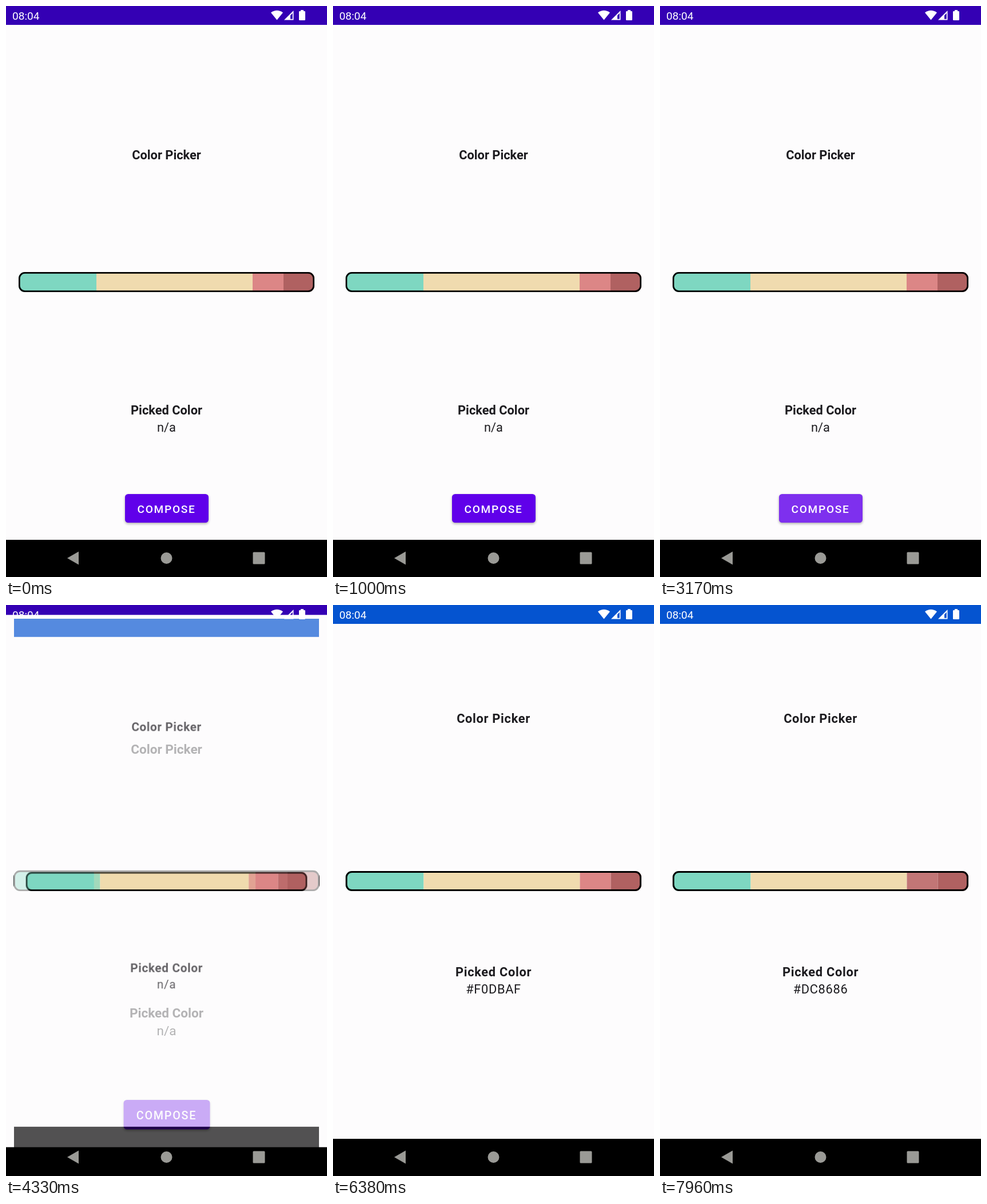
Recreate the animation shown at these times as an HTML page with a canvas. Size 561 px wide and 998 px high, loop 8000 ms.

```html
<!DOCTYPE html>
<html lang="en">
<head>
<meta charset="utf-8">
<title>Color Picker</title>
<style>
  html, body { margin: 0; width: 100%; height: 100%; overflow: hidden; background: #000; }
  canvas { display: block; }
</style>
</head>
<body>
<canvas id="stage" width="561" height="998"></canvas>
<script>
const W = 561, H = 998, CX = W / 2, LOOP = 8000;
const INK = '#1c1b1f', PAGE = '#fdfcfd';
const STATUS_H = 33, NAV_Y = 933;
const SWITCH_AT = 4247, SWITCH_MS = 400;
const BUTTON_TAP = 2830;
const PALETTE = ['#7ED7C1', '#F0DBAF', '#DC8686', '#B06161'];
const EDGES = [22, 158, 431, 485, 539];
const TAPS = [
  { at: 5540, slot: 0 },
  { at: 6380, slot: 1 },
  { at: 7400, slot: 2 }
];

const stage = document.getElementById('stage').getContext('2d');
const layerCanvas = document.createElement('canvas');
layerCanvas.width = W;
layerCanvas.height = H;
const layer = layerCanvas.getContext('2d');

const clamp = v => Math.min(1, Math.max(0, v));
const mix = (a, b, p) => a + (b - a) * p;

function cubic(a, b, c, d, t) {
  const u = 1 - t;
  return a * u * u * u + 3 * b * u * u * t + 3 * c * u * t * t + d * t * t * t;
}

// Two joined Bezier pieces: a quick start and a very slow finish.
function extraSlowIn(x) {
  if (x <= 0) return 0;
  if (x >= 1) return 1;
  const k = 1 / 6;
  const [xs, ys] = x < k
    ? [[0, 0.05, 0.133333, k], [0, 0, 0.06, 0.4]]
    : [[k, 0.208333, 0.25, 1], [0.4, 0.82, 1, 1]];
  let lo = 0, hi = 1;
  for (let i = 0; i < 24; i++) {
    const mid = (lo + hi) / 2;
    if (cubic(...xs, mid) < x) lo = mid; else hi = mid;
  }
  return cubic(...ys, lo);
}

function box(c, x, y, w, h, color) {
  c.fillStyle = color;
  c.fillRect(x, y, w, h);
}

function roundBox(c, x, y, w, h, r) {
  c.beginPath();
  c.roundRect(x, y, w, h, r);
}

function polygon(c, points) {
  c.beginPath();
  points.forEach(([x, y]) => c.lineTo(x, y));
  c.closePath();
}

function label(c, text, y, { weight = 400, size = 21.82, spacing = 0, color = INK } = {}) {
  c.font = `${weight} ${size}px Roboto, sans-serif`;
  c.letterSpacing = spacing + 'px';
  c.fillStyle = color;
  c.textAlign = 'left';
  c.fillText(text, CX - c.measureText(text).width / 2, y);
}

function ripple(c, age, x, y, reach, rgb, strength) {
  if (age <= 0 || age >= 800) return;
  const grow = 1 - (1 - clamp(age / 300)) ** 2;
  const alpha = strength * clamp(age / 75) * (1 - clamp((age - 560) / 240));
  c.fillStyle = `rgba(${rgb}, ${alpha})`;
  c.beginPath();
  c.arc(x, y, mix(8, reach, grow), 0, 7);
  c.fill();
}

function colorBar(c, time, shift, stroke) {
  const top = 465, height = 35;
  c.save();
  roundBox(c, 22, top, 517, height, 11);
  c.clip();
  PALETTE.forEach((color, i) => {
    const left = EDGES[i] + (i ? shift : 0);
    const width = EDGES[i + 1] + shift - left;
    box(c, left, top, width, height, color);
    for (const tap of TAPS) {
      if (tap.slot !== i) continue;
      c.save();
      c.beginPath();
      c.rect(left, top, width, height);
      c.clip();
      ripple(c, time - tap.at, left + width / 2, 482.5, width / 2 + 12, '0, 0, 0', 0.12);
      c.restore();
    }
  });
  c.restore();
  roundBox(c, 22 + stroke / 2, top + stroke / 2, 517 - stroke, height - stroke, 11 - stroke / 2);
  c.strokeStyle = '#000';
  c.lineWidth = stroke;
  c.stroke();
}

function frameBars(c, color) {
  box(c, 0, 0, W, H, PAGE);
  box(c, 0, 0, W, STATUS_H, color);
  box(c, 0, NAV_Y, W, H - NAV_Y, '#000');
}

function composeButton(c, time) {
  c.save();
  c.shadowColor = 'rgba(0, 0, 0, 0.32)';
  c.shadowBlur = 4;
  c.shadowOffsetY = 2;
  roundBox(c, 208, 853, 146, 50, 5.5);
  c.fillStyle = '#6000ea';
  c.fill();
  c.restore();
  c.save();
  roundBox(c, 208, 853, 146, 50, 5.5);
  c.clip();
  ripple(c, time - BUTTON_TAP, 281, 878, 84, '255, 255, 255', 0.19);
  c.restore();
  label(c, 'COMPOSE', 885.5, { weight: 500, size: 19.1, spacing: 1.7, color: '#fff' });
}

function firstScreen(c, time) {
  frameBars(c, '#3400b4');
  label(c, 'Color Picker', 268, { weight: 700 });
  colorBar(c, 0, 0, 2.7);
  label(c, 'Picked Color', 714, { weight: 700 });
  label(c, 'n/a', 744);
  composeButton(c, time);
}

function secondScreen(c, time) {
  const spacing = 0.68;
  const picked = TAPS.filter(tap => time >= tap.at).pop();
  frameBars(c, '#0554d0');
  label(c, 'Color Picker', 206, { weight: 700, spacing });
  colorBar(c, time, 0.5, 3);
  label(c, 'Picked Color', 649, { weight: 700, spacing });
  label(c, picked ? PALETTE[picked.slot] : 'n/a', 678.5, { spacing });
}

function systemIcons(c) {
  c.fillStyle = '#fff';
  c.font = '400 19.1px Roboto, sans-serif';
  c.letterSpacing = '0px';
  c.textAlign = 'left';
  c.fillText('08:04', 11, 24);

  c.beginPath();
  c.moveTo(473.5, 24.5);
  c.lineTo(463, 11.5);
  c.quadraticCurveTo(473.5, 4, 484, 11.5);
  c.closePath();
  c.fill();

  polygon(c, [[486, 24.5], [502.5, 8], [502.5, 24.5]]);
  polygon.call(null, c, [[486, 24.5], [502.5, 8], [502.5, 24.5]]);
  c.moveTo(497, 16.5);
  c.lineTo(500.8, 12.6);
  c.lineTo(500.8, 22.8);
  c.lineTo(497, 22.8);
  c.closePath();
  c.fill('evenodd');

  roundBox(c, 512, 9, 11, 16, 1.3);
  c.fill();
  c.fillRect(515, 7, 5, 3);

  c.fillStyle = '#9a9a96';
  polygon(c, [[107, 965], [127, 953.5], [127, 976.5]]);
  c.fill();
  c.beginPath();
  c.arc(280.5, 965, 10, 0, 7);
  c.fill();
  roundBox(c, 431.5, 954.5, 21, 21, 1.5);
  c.fill();
}

function scaleAboutCenter(c, s) {
  c.translate(CX, H / 2);
  c.scale(s, s);
  c.translate(-CX, -H / 2);
}

function draw(time) {
  const age = time - SWITCH_AT;
  const progress = extraSlowIn(age / SWITCH_MS);
  const alpha = clamp((age - 50) / 50);

  stage.save();
  scaleAboutCenter(stage, mix(1, 1.05, progress));
  firstScreen(stage, time);
  stage.restore();

  if (alpha > 0) {
    secondScreen(layer, time);
    stage.save();
    stage.globalAlpha = alpha;
    scaleAboutCenter(stage, mix(0.85, 1, progress));
    stage.drawImage(layerCanvas, 0, 0);
    stage.restore();
  }
  systemIcons(stage);
}

const start = performance.now();
function tick() {
  draw((performance.now() - start) % LOOP);
  requestAnimationFrame(tick);
}
tick();
</script>
</body>
</html>
```
